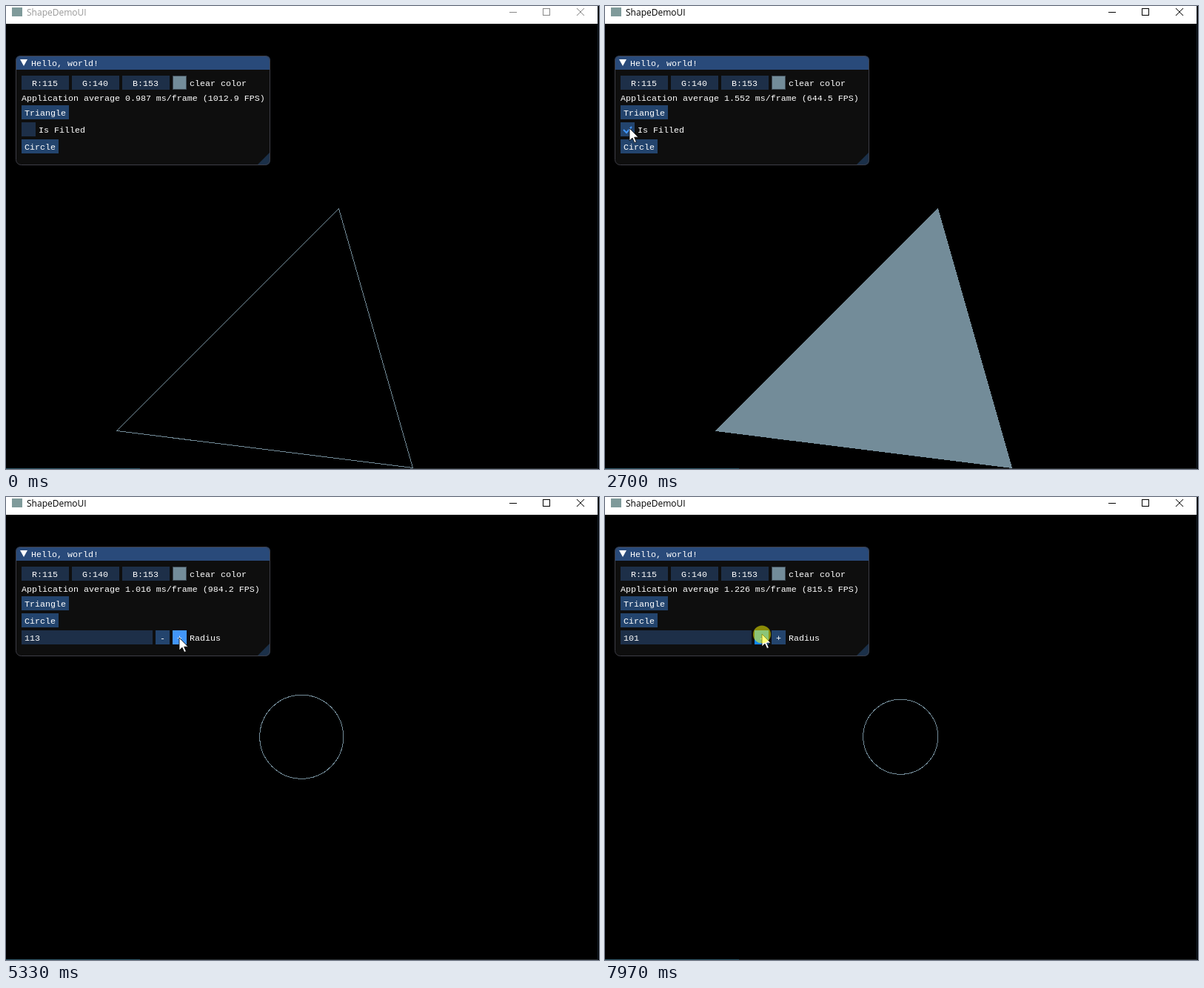
These frames come from a looping animation (801x625 px, 8000 ms). An HTML page:

```html
<!DOCTYPE html>
<html lang="en">
<head>
<meta charset="utf-8">
<title>Shape demo</title>
<style>
  html, body { margin: 0; width: 100%; height: 100%; overflow: hidden; background: #000; }
  svg { display: block; width: 801px; height: 625px; }
  text { white-space: pre; }
  .ui text { font: 11.667px "Liberation Mono", monospace; fill: #fff; }
  .crisp { shape-rendering: crispEdges; }
  .button { fill: #23446d; }
  .field { fill: #1d2f48; }
</style>
</head>
<body>
<svg viewBox="0 0 801 625">
  <rect width="801" height="625"/>
  <g class="crisp" fill="none" stroke="#738c99">
    <path id="triangle" d="M449.5 273.5L149.5 573.5L549.5 623.5Z"/>
    <circle id="circle" cx="399.25" cy="323.75"/>
  </g>

  <rect width="799" height="24" fill="#fff"/>
  <rect x="8" y="2" width="14" height="12" fill="#7f9a9a"/>
  <g id="caption">
    <text x="28" y="13" font-family="Open Sans, sans-serif" font-size="12">ShapeDemoUI</text>
    <path class="crisp" fill="none" stroke="currentColor" d="M680 8.5h10M725.5 3.5h9v9h-9z"/>
    <path fill="none" stroke="currentColor" d="M771 3l10 10M781 3l-10 10"/>
  </g>
  <path class="crisp" fill="#18222e" d="M799 0h1v625h-1z"/>
  <path class="crisp" fill="#2a2f33" d="M181 624h618v1H181z"/>
  <path class="crisp" fill="#2d5667" d="M0 624h181v1H0z"/>

  <g class="ui">
    <rect x="13.5" y="67.5" width="343" height="147" rx="7" fill="#0e0e0e"/>
    <path fill="#294a7a" d="M13 86V74q0-7 7-7h330q7 0 7 7v12z"/>
    <path fill="#1b3049" d="M357 197v11q0 7-7 7h-11z"/>
    <rect x="13.5" y="67.5" width="343" height="147" rx="7" fill="none" stroke="#3e3e47"/>
    <path fill="#fff" d="M19 72h10l-5 9z"/>
    <text x="34" y="81">Hello, world!</text>
    <path class="field" d="M21 94h64v19H21zM89 94h64v19H89zM157 94h64v19H157z"/>
    <text x="35" y="108">R:115</text>
    <text x="103" y="108">G:140</text>
    <text x="171" y="108">B:153</text>
    <rect x="225.5" y="94.5" width="18" height="18" fill="#738c99" stroke="#3e4a55"/>
    <text x="248" y="108">clear color</text>
    <text id="stats" x="21" y="128"></text>
    <rect class="button" x="21" y="134" width="64" height="19"/>
    <text x="25" y="148">Triangle</text>

    <g id="trianglePanel">
      <rect id="box" x="21" y="157" width="19" height="19"/>
      <path id="check" fill="none" stroke="#4296fa" stroke-width="2" d="M25 167l4 4l7-8"/>
      <text x="44" y="171">Is Filled</text>
      <rect id="circleButton" x="21" y="180" width="50" height="19"/>
      <text x="25" y="194">Circle</text>
    </g>

    <g id="circlePanel">
      <rect class="button" x="21" y="157" width="50" height="19"/>
      <text x="25" y="171">Circle</text>
      <rect class="field" x="21" y="180" width="177" height="19"/>
      <text id="radius" x="25" y="194"></text>
      <rect id="minus" x="202" y="180" width="19" height="19"/>
      <text x="208" y="194">-</text>
      <rect id="plus" x="225" y="180" width="19" height="19"/>
      <text x="231" y="194">+</text>
      <text x="248" y="194">Radius</text>
    </g>
  </g>

  <g id="pointer">
    <path fill="#fff" stroke="#000" stroke-width=".8" d="M0 0V17L4 13.2L6.8 19.5L9.4 18.4L6.6 12.2H12Z"/>
    <circle id="press" cx="0" cy=".5" r="12" fill="#ff0" fill-opacity=".52"/>
  </g>
</svg>
<script>
const LOOP = 8000;
const FOCUS = 2615, FILL = 2690, UNFILL = 3475, SWITCH = 4480;
const plusClicks = [5230, 5400, 5560, 5720, 5880, 6030, 6150, 6270];
const minusClicks = [6805, 6875, 7130, 7280, 7430, 7580];
const HOLD = 7580, REPEAT = 7665;

// time, x, y
const path = [
  [70, 556, 626], [450, 470, 500], [840, 335, 343], [1250, 170, 240],
  [1550, 60, 155], [1700, 26, 150], [2160, 41, 147], [2540, 33, 165],
  [3300, 33, 165], [3480, 32, 164], [3800, 32, 164], [4200, 45, 187],
  [4520, 45, 187], [4980, 234, 190], [6340, 234, 190], [6700, 212, 185], [8000, 212, 185]
];
// tick, frames per second
const rates = [[0, 1012.9], [28, 997.9], [33, 985], [35, 644.5], [45, 602.8],
  [55, 900], [69, 984.2], [90, 934], [103, 815.5]];

const el = {};
document.querySelectorAll("[id]").forEach(e => el[e.id] = e);

const show = (e, on) => e.setAttribute("display", on ? "inline" : "none");
const fill = (e, color) => e.setAttribute("fill", color);
const passed = (list, t) => list.filter(c => c <= t).length;

function segment(keys, t) {
  let i = 0;
  while (i < keys.length - 2 && t >= keys[i + 1][0]) i++;
  const a = keys[i], b = keys[i + 1];
  const u = Math.min(1, Math.max(0, (t - a[0]) / (b[0] - a[0])));
  return { u, at: k => a[k] + (b[k] - a[k]) * u };
}

function frameRate(t) {
  const tick = Math.floor(t / 77.2 + 0.2);
  const s = segment(rates, tick);
  return s.at(1) + 9 * Math.sin(tick * 2.4) * Math.sin(Math.PI * s.u);
}

function isPressed(t) {
  if (t >= HOLD) return true;
  return [FOCUS, 3395, 4400, ...plusClicks, ...minusClicks].some(c => t >= c && t < c + 70);
}

function buttonColor(hover, down) {
  return !hover ? "#23446d" : down ? "#0f87fa" : "#4296fa";
}

function draw(t) {
  const pos = segment(path, t), x = pos.at(1), y = pos.at(2);
  const down = isPressed(t), active = t >= FOCUS;
  const over = (l, top, w) => active && x >= l && x < l + w && y >= top && y < top + 19;

  el.caption.setAttribute("fill", active ? "#000" : "#999");
  el.caption.setAttribute("color", active ? "#000" : "#888");

  const fps = frameRate(t);
  el.stats.textContent =
    `Application average ${(1000 / fps).toFixed(3)} ms/frame (${fps.toFixed(1)} FPS)`;

  const filled = t >= FILL && t < UNFILL, round = t >= SWITCH;
  show(el.trianglePanel, !round);
  show(el.triangle, !round);
  show(el.circlePanel, round);
  show(el.circle, round);
  show(el.check, filled);
  fill(el.triangle, filled ? "#738c99" : "none");
  fill(el.box, !over(21, 157, 19) ? "#1d2f48" : down ? "#3169ac" : "#23446d");
  fill(el.circleButton, buttonColor(over(21, 180, 50), down));
  fill(el.minus, buttonColor(over(202, 180, 19), down));
  fill(el.plus, buttonColor(over(225, 180, 19), down));

  const held = Math.max(0, Math.floor((t - REPEAT) / 23));
  const size = 112 + passed(plusClicks, t) - passed(minusClicks, t) - held;
  el.radius.textContent = size;
  el.circle.setAttribute("r", size / 2);

  show(el.pointer, t >= 70);
  el.pointer.setAttribute("transform", `translate(${Math.round(x)} ${Math.round(y)})`);
  show(el.press, down);
}

const start = performance.now();
function loop() {
  draw((performance.now() - start) % LOOP);
  requestAnimationFrame(loop);
}
draw(0);
requestAnimationFrame(loop);
</script>
</body>
</html>
```
